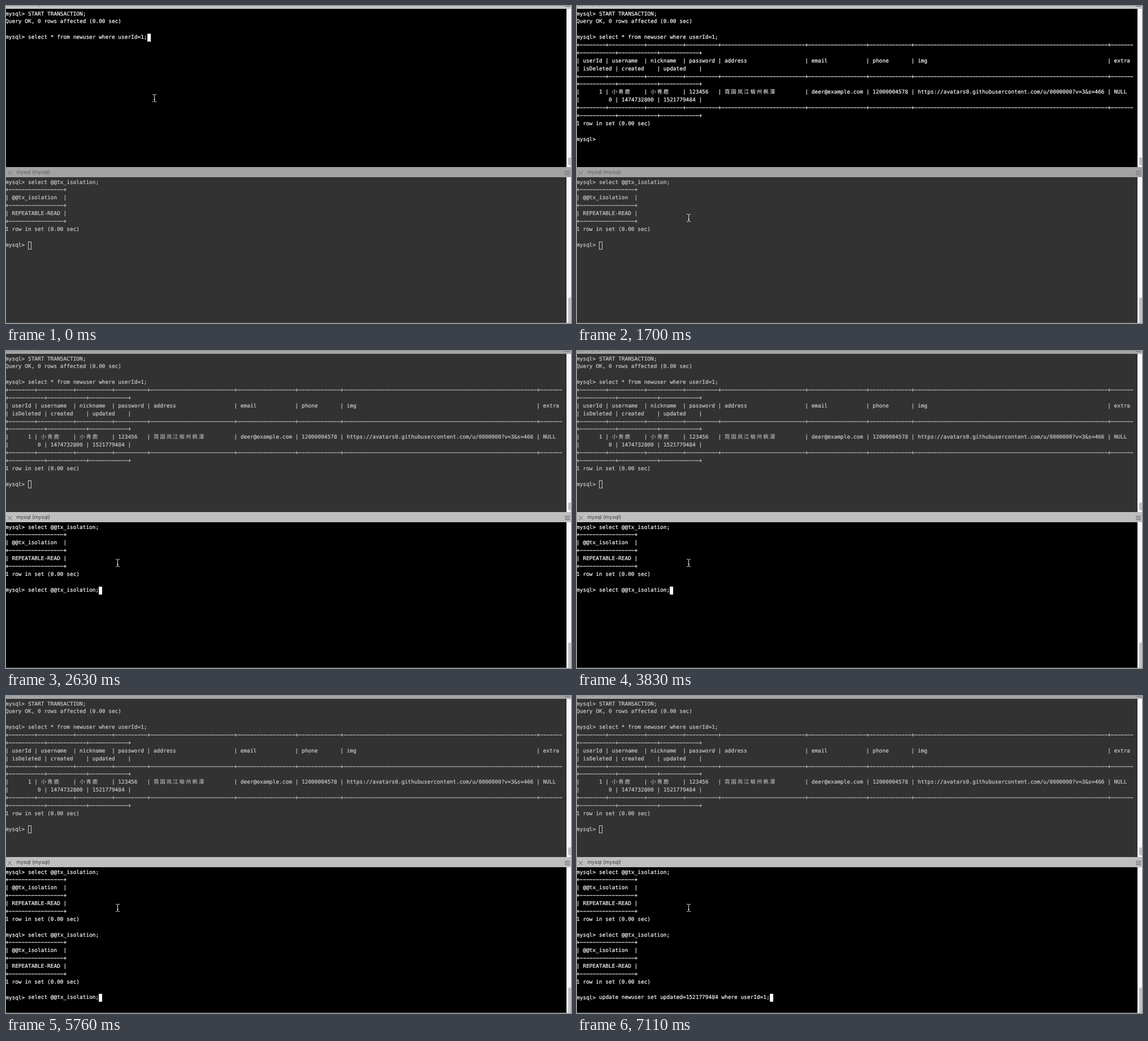
An HTML page that plays this animation: 999 px wide and 561 px high, repeating every 8 s.

```html
<!DOCTYPE html>
<html lang="en">
<head>
<meta charset="utf-8">
<title>Two MySQL sessions</title>
<style>
  html, body { margin: 0; width: 100%; height: 100%; overflow: hidden; background: #000; }
  #stage { position: relative; width: 999px; height: 561px; overflow: hidden; }
  #stage * { animation: 8s step-end infinite; }

  .pane { --w: 5.7px; --h: 13.87px; position: absolute; left: 0; width: 999px; overflow: hidden; }
  #upper { top: -13px; height: 298px; animation-name: blur; }
  #lower { top: 285px; height: 276px; animation-name: focus; }

  .bar { position: absolute; inset: 0 0 auto; height: 18px; }
  #upper .bar { animation-name: bar-blur; }
  #lower .bar { animation-name: bar-focus; }
  .bar span { position: absolute; left: 18.5px; top: 1px; font: 9px/18px Inter, "Liberation Sans", sans-serif; text-rendering: geometricPrecision; }
  .bar svg { position: absolute; left: 0; top: 1px; fill: none; stroke: currentColor; stroke-opacity: .75; }

  .track { position: absolute; right: 0; top: 18px; bottom: 0; width: 8px; background: #f7f7f7; }
  .thumb { position: absolute; right: 0; width: 5px; background: #c2c2c2; border-radius: 3px 0 0 3px; }
  #upper .thumb { top: 263px; height: 14px; }
  #lower .thumb { top: 213px; height: 50px; }
  .edge { position: absolute; left: 0; bottom: 0; width: 991px; height: 1px; background: #4a4a4a; }

  pre, .cursor {
    --c: 0; --r: 0;
    position: absolute; margin: 0;
    left: calc(var(--c) * var(--w) - .9px);
    top: calc(var(--r) * var(--h) + 20.57px);
  }
  pre {
    font: 9.468px/13.87px "DejaVu Sans Mono", "Noto Sans CJK SC", "Noto Sans CJK", monospace;
    text-rendering: geometricPrecision;
    -webkit-text-stroke: .2px currentColor;
  }
  .cjk { letter-spacing: 1.93px; -webkit-text-stroke: 0; }
  .cursor { width: 6px; height: 14px; box-sizing: border-box; border: 1px solid currentColor; }
  #upper .cursor { animation-name: cursor-up; }
  #lower .cursor { animation-name: cursor-low; }

  #result { --r: 4; animation-name: result; }
  #cmd1 { --c: 7; --r: 8; animation-name: cmd1; }
  #log2 { --r: 9; animation-name: log2; }
  #cmd2 { --c: 7; --r: 16; animation-name: cmd2; }
  #cmd3 { --c: 7; --r: 16; animation-name: cmd3; }

  #beam { position: absolute; left: -5px; top: -8px; fill: none; stroke: #e4e4e4; animation-name: beam; }

  @keyframes blur  { 0% { background: #000; color: #fff; } 25%, 100% { background: #323232; color: #cbcbcb; } }
  @keyframes focus { 0% { background: #323232; color: #cbcbcb; } 25%, 100% { background: #000; color: #fff; } }
  @keyframes bar-blur  { 0% { background: #c4c6c5; color: #383838; } 25%, 100% { background: #a5a5a5; color: #5c5c5c; } }
  @keyframes bar-focus { 0% { background: #a3a3a3; color: #5c5c5c; } 25%, 100% { background: #bfbfbf; color: #383838; } }

  @keyframes cursor-up {
    0% { --c: 44; --r: 3; opacity: 1; background: #fff; }
    7.5% { --c: 7; --r: 16; }
    21.25% { opacity: 0; }
    25%, 100% { --c: 7; --r: 16; opacity: 1; background: transparent; }
  }
  @keyframes cursor-low {
    0% { --c: 7; --r: 8; opacity: 1; background: transparent; }
    25% { opacity: 0; background: #fff; }
    28.75% { opacity: 1; }
    32.875% { --c: 29; }
    40.375% { --c: 7; }
    47.875% { --c: 29; }
    60.875% { opacity: 0; }
    62.75% { --c: 7; --r: 16; opacity: 1; }
    72% { --c: 29; }
    75.75% { --c: 7; }
    79.5% { --c: 29; }
    87% { opacity: 0; }
    88.875%, 100% { --c: 60; --r: 16; opacity: 1; background: #fff; }
  }

  @keyframes result { 0% { opacity: 0; } 7.5%, 100% { opacity: 1; } }
  @keyframes cmd1 { 0%, 40.375% { opacity: 0; } 32.875%, 47.875%, 100% { opacity: 1; } }
  @keyframes log2 { 0% { opacity: 0; } 62.75%, 100% { opacity: 1; } }
  @keyframes cmd2 { 0%, 75.75%, 88.875%, 100% { opacity: 0; } 72%, 79.5% { opacity: 1; } }
  @keyframes cmd3 { 0% { opacity: 0; } 88.875%, 100% { opacity: 1; } }

  @keyframes beam {
    0% { transform: translate(262px, 163px); }
    15.75% { transform: translate(271px, 217px); }
    17.625% { transform: translate(251px, 281px); }
    19.375% { transform: translate(205px, 367px); }
    21.25%, 100% { transform: translate(197px, 375px); }
  }
</style>
</head>
<body>
<div id="stage">
  <div class="pane" id="upper">
    <pre>mysql&gt; START TRANSACTION;
Query OK, 0 rows affected (0.00 sec)

mysql&gt; select * from newuser where userId=1;</pre>
    <pre id="result"></pre>
  </div>
  <div class="pane" id="lower">
    <pre id="log1"></pre>
    <pre id="cmd1">select @@tx_isolation;</pre>
    <pre id="log2"></pre>
    <pre id="cmd2">select @@tx_isolation;</pre>
    <pre id="cmd3">update newuser set updated=1521779484 where userId=1;</pre>
    <div class="edge"></div>
  </div>
  <svg id="beam" width="10" height="16" viewBox="-5 -8 10 16">
    <path d="M-3 -6.5H-1.5Q0 -6.5 .5 -5Q1 -6.5 2.5 -6.5H4M.5 -5V5M-3 6.5H-1.5Q0 6.5 .5 5Q1 6.5 2.5 6.5H4M-1 2.5H2"/>
  </svg>
</div>
<script>
  const $ = id => document.getElementById(id);
  const CJK = /[\u4e00-\u9fff]+/g;
  const DONE = '1 row in set (0.00 sec)\n\nmysql> ';
  const DASH = '\u2212'; // as wide as the terminal's own hyphen

  const chrome = `<div class="bar">
    <svg width="999" height="18"><path d="M3 6l7 7M10 6l-7 7M988 6.5h9M988 9.5h9M988 12.5h9"/></svg>
    <span>mysql (mysql)</span></div>
    <div class="track"><div class="thumb"></div></div><div class="cursor"></div>`;
  for (const pane of document.querySelectorAll('.pane')) pane.insertAdjacentHTML('beforeend', chrome);

  const rule = widths => widths.map(n => '+' + DASH.repeat(n)).join('');
  // Han characters take two cells each
  const cell = (text, width) => {
    const wide = (text.match(CJK) || []).join('').length;
    return '| ' + text.padEnd(width - 1 - wide);
  };
  const row = (widths, values) => widths.map((n, i) => cell(values[i], n)).join('');

  // The table is too wide for the window, so each row wraps onto a second line
  const head = [8, 11, 11, 10, 26, 18, 13, 60, 7];
  const tail = [11, 12, 12];
  const line = rule(head) + '\n' + rule(tail) + '+';
  const wrapped = (a, b) => row(head, a) + '\n' + row(tail, b) + '|';

  const table = [
    line,
    wrapped(['userId', 'username', 'nickname', 'password', 'address', 'email', 'phone', 'img', 'extra'],
            ['isDeleted', 'created', 'updated']),
    line,
    wrapped(['     1', '小青鹿', '小青鹿', '123456', '霓国岚江榆州枫潭', 'deer@example.com', '12000004578',
             'https://avatars0.githubusercontent.com/u/0000000?v=3&s=466', 'NULL'],
            ['        0', '1474732800', '1521779484']),
    line,
    DONE
  ].join('\n');
  $('result').innerHTML = table.replace(/&/g, '&amp;').replace(CJK, s => `<span class="cjk">${s}</span>`);

  const bar = rule([17]) + '+';
  const level = [bar, row([17], ['@@tx_isolation']) + '|', bar, row([17], ['REPEATABLE-READ']) + '|', bar, DONE].join('\n');
  $('log1').textContent = 'mysql> select @@tx_isolation;\n' + level;
  $('log2').textContent = level;
</script>
</body>
</html>
```
